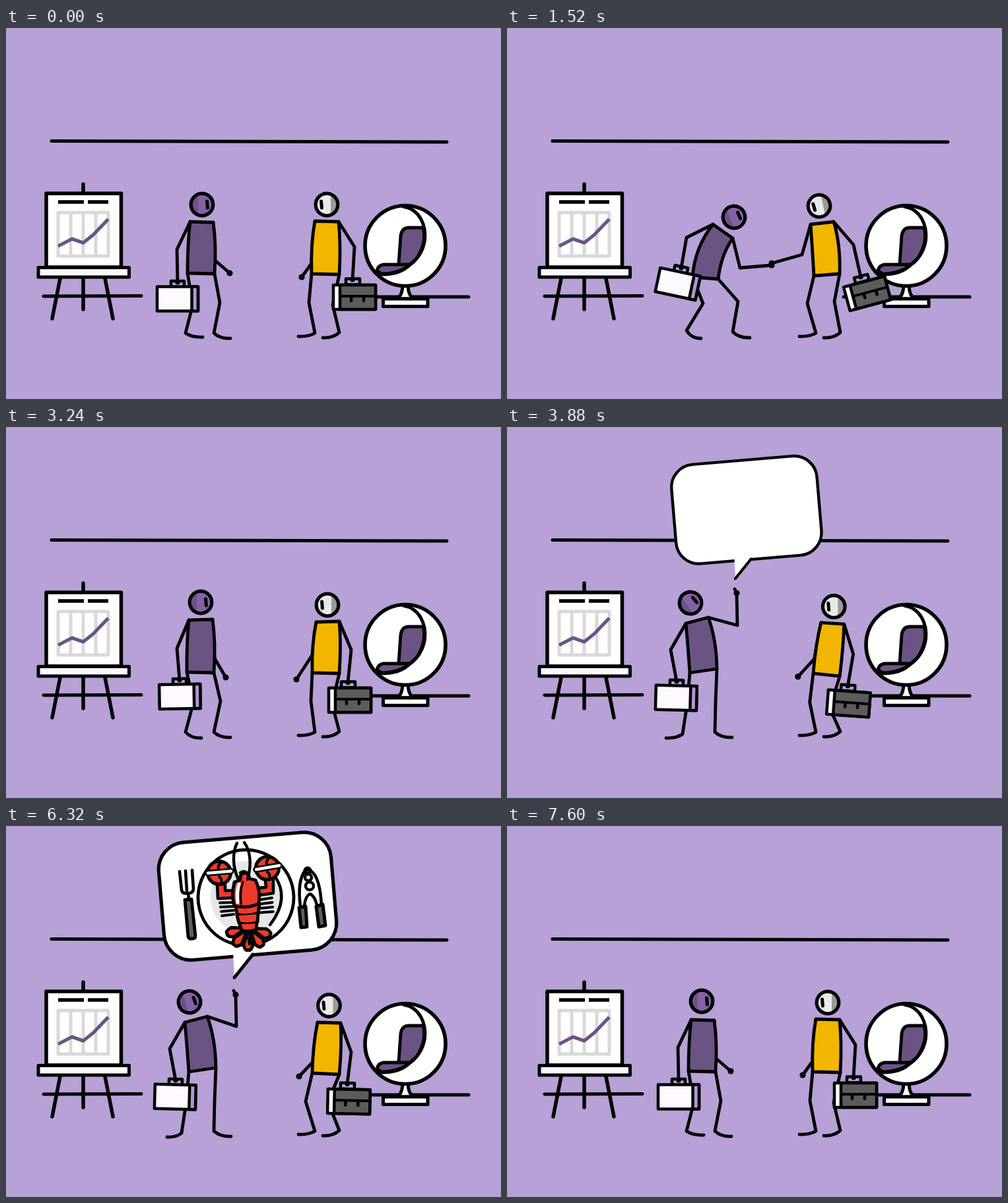
Write an HTML page with a canvas that moves like this. It is 750 px wide and 563 px high and loops after 7800 ms.

```html
<!DOCTYPE html>
<html lang="en">
<head>
<meta charset="utf-8">
<title>Lunch plans</title>
<style>
html, body { margin: 0; width: 100%; height: 100%; overflow: hidden; background: #b7a1d6; }
canvas { display: block; }
</style>
</head>
<body>
<canvas id="stage" width="750" height="563"></canvas>
<script>
const ctx = document.getElementById('stage').getContext('2d');
const LOOP = 7800, STEP = 40;
const BG = '#b7a1d6', INK = '#000', PLUM = '#6b5484', LILAC = '#8461a7',
      YELLOW = '#f2b600', RED = '#ee3a2b', DARK = '#5c5c5c', WHITE = '#fff';

const clamp = v => Math.max(0, Math.min(1, v));
const ease = v => v * v * (3 - 2 * v);
const ramp = (t, a, b) => clamp((t - a) / (b - a));

// ---------- drawing helpers ----------
const shapes = new Map();
function shape(d) {
  if (!shapes.has(d)) {
    const el = document.createElementNS('http://www.w3.org/2000/svg', 'path');
    el.setAttribute('d', d);
    shapes.set(d, { path: new Path2D(d), len: el.getTotalLength() });
  }
  return shapes.get(d);
}
function draw(d, fill, width = 5, color = INK) {
  const p = shape(d).path;
  if (fill) { ctx.fillStyle = fill; ctx.fill(p); }
  if (width) { ctx.lineWidth = width; ctx.strokeStyle = color; ctx.stroke(p); }
}
function trim(d, to, width = 4.4, color = INK, from = 0) {
  if (to <= from) return;
  const s = shape(d);
  ctx.save();
  if (from > 0 || to < 1) {
    ctx.setLineDash([(to - from) * s.len, s.len * 2]);
    ctx.lineDashOffset = -from * s.len;
  }
  ctx.lineWidth = width;
  ctx.strokeStyle = color;
  ctx.stroke(s.path);
  ctx.restore();
}
function tint(d, fill, alpha) {
  if (alpha <= 0) return;
  ctx.globalAlpha = alpha;
  draw(d, fill, 0);
  ctx.globalAlpha = 1;
}
function line(points, width = 5) {
  ctx.beginPath();
  for (let i = 0; i < points.length; i += 2) ctx.lineTo(points[i], points[i + 1]);
  ctx.lineWidth = width;
  ctx.strokeStyle = INK;
  ctx.stroke();
}
function box(x, y, w, h, fill, width = 4.5) {
  ctx.fillStyle = fill;
  ctx.fillRect(x, y, w, h);
  ctx.lineWidth = width;
  ctx.strokeStyle = INK;
  ctx.strokeRect(x, y, w, h);
}
function disc(x, y, r, fill) {
  ctx.beginPath();
  ctx.arc(x, y, r, 0, 7);
  ctx.fillStyle = fill;
  ctx.fill();
}

// ---------- poses ----------
// h: head x, y, tilt   t: torso corners   c: side bends   b: case arm elbow, hand, case angle
// f: free arm elbow, hand, fingertip      l, r: knee, ankle, toe
const L = {
  stand: {
    h: [295, 266, 0], t: [279, 294, 314, 295, 316, 373, 275, 372], c: [-2, 4],
    b: [259, 336, 260, 386, 0], f: [316, 352, 339, 372, 339, 372],
    l: [283, 420, 272, 463, 298, 469], r: [324, 417, 315, 463, 340, 471]
  },
  shake: {
    h: [341, 286, -18], t: [312, 300, 343, 318, 322, 381, 281, 378], c: [-12, -7],
    b: [269, 314, 266, 364, 7], f: [353, 363, 401, 357, 401, 357],
    l: [297, 418, 272, 459, 294, 471], r: [350, 415, 342, 461, 368, 470]
  },
  rest: {
    h: [295, 266, 0], t: [277, 293, 313, 292, 315, 373, 274, 372], c: [-2, 4],
    b: [259, 336, 263, 384, -1], f: [316, 351, 333, 380, 333, 380],
    l: [284, 418, 272, 463, 296, 472], r: [325, 416, 315, 463, 340, 471]
  },
  tell: {
    h: [278, 267, -35], t: [271, 298, 305, 289, 318, 367, 277, 373], c: [0, 6],
    b: [248, 338, 257, 386, 1.5], f: [349, 301, 348, 252, 345, 246],
    l: [273, 420, 266, 466, 241, 472], r: [316, 418, 315, 463, 341, 471]
  }
};
const R = {
  stand: {
    h: [486, 268, 0], t: [468, 293, 504, 294, 505, 374, 463, 373], c: [-4, 3],
    b: [528, 332, 525, 382, 0], f: [468, 350, 448, 378, 448, 378],
    l: [459, 417, 468, 463, 443, 468], r: [495, 420, 505, 462, 480, 470]
  },
  shake: {
    h: [473, 270, -12], t: [460, 298, 495, 294, 504, 373, 465, 376], c: [0, 6],
    b: [525, 329, 526, 378, -10], f: [447, 344, 401, 357, 401, 357],
    l: [455, 418, 468, 463, 443, 468], r: [496, 415, 505, 462, 480, 470]
  },
  rest: {
    h: [487, 270, 0], t: [470, 296, 505, 295, 505, 374, 464, 373], c: [-4, 3],
    b: [523, 338, 518, 388, 0], f: [464, 346, 440, 383, 440, 383],
    l: [462, 416, 468, 463, 443, 468], r: [494, 420, 505, 462, 480, 470]
  },
  listen: {
    h: [497, 273, 0], t: [477, 297, 512, 300, 504, 379, 464, 374], c: [-2, 2],
    b: [525, 346, 516, 394, 5], f: [466, 353, 441, 378, 441, 378],
    l: [458, 418, 468, 463, 443, 468], r: [488, 428, 505, 462, 480, 470]
  },
  nod: {
    h: [489.5, 272.5, 0], t: [472, 298, 507, 299, 505, 377, 464, 375], c: [-3, 3],
    b: [523, 343, 517, 391.5, 1.2], f: [465, 358, 444, 380, 444, 380],
    l: [454, 418, 468, 463, 443, 468], r: [488, 419, 505, 462, 480, 470]
  }
};

// Each key may set only some channels; every channel moves between its own keys.
const leftKeys = [
  [0, { ...L.stand, h: [297, 268, 0] }],
  [280, { r: [342, 408, 333, 450, 358, 458] }],
  [600, L.shake],
  [960, { h: L.shake.h, t: L.shake.t, b: L.shake.b, f: L.shake.f }],
  [1360, { b: [271, 317, 263, 364, 15] }],
  [1520, {
    h: [344, 287, -18], t: [312, 298, 342, 319, 320, 381, 281, 378],
    b: [272, 318, 264, 364, 12], f: [353, 364, 401, 360, 401, 360]
  }],
  [1640, { ...L.shake, h: [344, 287, -18], b: [270, 318, 263, 365, 11] }],
  [1900, { r: [340, 408, 331, 452, 356, 460] }],
  [2160, {
    ...L.rest, h: [293, 261, 0], b: [257, 334, 257, 382, 4],
    t: [276, 289, 311, 288, 315, 372, 274, 371]
  }],
  [2560, L.rest],
  [3240, L.rest],
  [3480, {
    b: [242, 334, 245, 382, 12], f: [338, 328, 374, 338, 375, 334],
    l: [276, 415, 264, 453, 252, 462]
  }],
  [3760, L.tell],
  [5680, L.tell],
  [6320, {
    ...L.tell, h: [278, 267, -15], f: [349, 304, 348, 256, 345, 250],
    l: [273, 420, 266, 466, 244, 472]
  }],
  [6640, { f: [338, 332, 372, 338, 372, 338], l: [280, 412, 268, 454, 274, 463] }],
  [7000, L.stand],
  [LOOP, L.stand]
];
const swing = (x, y, a) => ({ b: [525, 329, x, y, a] });
const rightKeys = [
  [0, R.stand],
  [600, R.shake],
  [960, swing(526, 378, -6.5)],
  [1360, swing(540, 376, -22)],
  [1520, swing(536, 378, -15)],
  [1600, swing(524, 381, -4)],
  [1640, { ...R.shake, b: [525, 330, 522, 382, -3] }],
  [2240, R.rest],
  [3440, R.rest],
  [4040, R.listen],
  [5680, R.listen],
  [6280, R.nod],
  [6400, R.nod],
  [7000, R.rest],
  [7240, R.rest],
  [7600, R.stand],
  [LOOP, R.stand]
];
const bubbleKeys = [
  [0, { s: [0] }], [3640, { s: [0] }], [3960, { s: [1] }], [6320, { s: [1] }],
  [6500, { s: [1.033] }], [6840, { s: [0] }], [LOOP, { s: [0] }]
];

function tracks(keys) {
  const out = {};
  for (const [t, pose] of keys)
    for (const name in pose) (out[name] ||= []).push([t, pose[name]]);
  return out;
}
function poseAt(tr, t) {
  const pose = {};
  for (const name in tr) {
    const keys = tr[name];
    let i = 0;
    while (i < keys.length - 2 && t >= keys[i + 1][0]) i++;
    const [t0, a] = keys[i], [t1, b] = keys[i + 1];
    const k = ease(ramp(t, t0, t1));
    pose[name] = a.map((v, j) => v + (b[j] - v) * k);
  }
  return pose;
}
const leftTrack = tracks(leftKeys), rightTrack = tracks(rightKeys), bubbleTrack = tracks(bubbleKeys);

// ---------- people ----------
function leg(x, y, [kx, ky, ax, ay, tx, ty]) {
  ctx.beginPath();
  ctx.moveTo(x, y);
  ctx.lineTo(kx, ky);
  ctx.lineTo(ax, ay);
  ctx.quadraticCurveTo(ax + (tx - ax) * 0.35, ty + 0.5, tx, ty);
  ctx.lineWidth = 4.8;
  ctx.strokeStyle = INK;
  ctx.stroke();
}
function head([x, y, tilt], dir) {
  ctx.save();
  ctx.translate(x, y);
  ctx.rotate(tilt * Math.PI / 180);
  ctx.beginPath();
  ctx.arc(0, 0, 16.8, 0, 7);
  ctx.save();
  ctx.clip();
  ctx.fillStyle = dir > 0 ? LILAC : '#e9e9e9';
  ctx.fillRect(-20, -20, 40, 40);
  ctx.fillStyle = dir > 0 ? PLUM : '#9a9a9a';
  ctx.fillRect(dir > 0 ? -20 : 6, -20, 14, 40);
  ctx.restore();
  ctx.lineWidth = 5.2;
  ctx.strokeStyle = INK;
  ctx.stroke();
  line([dir * 8 - 0.4, -5, dir * 8 + 0.4, 5], 5);
  ctx.restore();
}
function briefcase([, , x, y, angle], dir) {
  ctx.save();
  ctx.translate(x, y);
  ctx.rotate(angle * Math.PI / 180);
  ctx.lineWidth = 4.5;
  ctx.strokeStyle = INK;
  if (dir > 0) {
    ctx.strokeRect(-10, -2, 20, 9);
    box(-31, 6.5, 62, 37, '#fdf9ff');
    box(21.5, 6.5, 9.5, 37, '#b195d6');
  } else {
    ctx.strokeRect(-10, -1.5, 21, 9);
    box(-29, 8, 64, 37, WHITE);
    box(-19, 8, 54, 37, DARK);
    line([-19, 25, 35, 25], 4);
    line([-2, 26, -2, 32], 4.5);
    line([17, 26, 17, 32], 4.5);
  }
  ctx.restore();
  disc(x, y, 3.6, INK);
}
function person(p, dir) {
  const [x0, y0, x1, y1, x2, y2, x3, y3] = p.t, [cl, cr] = p.c;
  const free = dir > 0 ? [x1, y1] : [x0, y0], carry = dir > 0 ? [x0, y0] : [x1, y1];
  leg(x3, y3, p.l);
  leg(x2, y2, p.r);
  line([...free, ...p.f], 4.8);
  disc(p.f[2], p.f[3], 4.6, INK);
  ctx.beginPath();
  ctx.moveTo(x0, y0);
  ctx.lineTo(x1, y1);
  ctx.quadraticCurveTo((x1 + x2) / 2 + cr, (y1 + y2) / 2 - 5, x2, y2);
  ctx.lineTo(x3, y3);
  ctx.quadraticCurveTo((x0 + x3) / 2 + cl, (y0 + y3) / 2 - 5, x0, y0);
  ctx.closePath();
  ctx.fillStyle = dir > 0 ? PLUM : YELLOW;
  ctx.fill();
  ctx.lineWidth = 4.8;
  ctx.strokeStyle = INK;
  ctx.stroke();
  line([...carry, ...p.b.slice(0, 4)], 4.8);
  briefcase(p.b, dir);
  head(p.h, dir);
}

// ---------- room ----------
function room() {
  ctx.fillStyle = BG;
  ctx.fillRect(0, 0, 750, 563);
  line([69, 171.5, 668, 173]);
  line([57, 407, 205, 406.5]);
  line([510, 408, 701, 408]);
  // easel
  line([117, 237, 117, 427], 5.5);
  line([82, 380, 70, 441], 5.5);
  line([150, 380, 162, 441], 5.5);
  box(61, 251, 113.5, 112, WHITE, 5.5);
  box(49, 363.5, 137.5, 14.5, '#fdf6ff', 5);
  ctx.lineCap = 'butt';
  line([79, 264, 118, 264], 5.5);
  line([124, 264, 155, 264], 5.5);
  draw('M79 280H155V346H79ZM98 280V346M117 280V346M136 280V346', null, 5, '#d9d9d9');
  draw('M79 331L100 320L117 326L132 314L155 290', null, 5.2, PLUM);
  ctx.lineCap = 'round';
  // ball chair
  draw('M601 388Q601 409 590 411H620Q609 409 609 388Z', WHITE, 5);
  box(571.5, 411, 67.5, 11.5, WHITE, 5);
  draw('M544 330.5A61 61 0 1 1 666 330.5A61 61 0 1 1 544 330.5Z', WHITE, 5.6);
  draw('M595 358L598 315Q600 303 610 303H632Q638 325 622 350L608 362Z', PLUM, 4.8);
  draw('M562 368Q564 360 572 359H612Q598 374 570 374Z', PLUM, 4.8);
  draw('M602 271C626 275 637 298 634.5 322C630 350 606 374 566 373', null, 5);
}

// ---------- speech bubble ----------
const FORK = 'M271 112L276 168Q277 172 282 171Q287 171 287 167L281 111Z';
const GRIPS = ['M444 124L447 154L456 153L454 122Z', 'M470 122L474 153L484 151L480 119Z'];
const BODY = 'M346 85Q341 106 346 121Q365 126 383 118Q386 98 378 82L369 80Q368 71 361 71Q354 72 355 82Z';
const BANDS = [
  'M348 122L350 134Q366 138 382 132L384 119',
  'M350 136L353 147Q367 151 381 146L382 134',
  'M354 149L357 158Q368 162 379 157L380 148'
];
const CLAWS = [
  { x: 323, y: 71, tilt: 1.5, hook: 'M317 84Q323 78 330 83L332 95' },
  { x: 396, y: 64, tilt: 3, hook: 'M402 76L392 76Q388 82 391 92' }
];
const ARMS = [
  { core: 'M346 103L327 104L326 90', top: 'M345 98L332 98L332 89', low: 'M345 109L321 110L320 88' },
  { core: 'M381 100L400 97L399 84', top: 'M381 94L394 93L393 83', low: 'M384 105L405 102L405 80' }
];
const ARCS = ['M317 84Q330 62 352 55', 'M342 156Q350 163 363 163', ...CLAWS.map(c => c.hook)];
const circle = (x, y, r) => `M${x} ${y + r}A${r} ${r} 0 1 1 ${x} ${y - r}A${r} ${r} 0 1 1 ${x} ${y + r}`;
const fan = [72, -72, 37, -37, 0].map(deg => {
  const at = (a, r) => `${368 + r * Math.sin(a)} ${154 + r * Math.cos(a)}`;
  const a = (deg - 2) * Math.PI / 180;
  return `M${at(a, 4)}L${at(a - 0.27, 27)}Q${at(a - 0.12, 37)} ${at(a, 34)}Q${at(a + 0.12, 37)} ${at(a + 0.27, 27)}Z`;
});

function plate(t) {
  tint(circle(365, 108, 55), '#e6e6e6', ramp(t, 4840, 5080));
  trim('M381 179A72.5 72.5 0 1 0 346 179Q363 183 381 179', ramp(t, 4000, 4860), 4.8);
  trim('M405 73Q432 108 400 150', ramp(t, 4360, 4800));
  for (const d of ARCS) trim(d, ramp(t, 4440, 4780), 4.4, INK, ramp(t, 4840, 5040));
}
function cutlery(t) {
  const a = ramp(t, 4300, 5000), b = ramp(t, 4480, 5200), tone = ramp(t, 4880, 5160);
  tint(FORK, DARK, tone);
  trim('M263 69L266 97Q267 103 275 102', a, 4.6);
  trim('M272 68L274 98', a, 4.6);
  trim('M277 112L276 102Q284 102 284 95L282 67', a, 4.6);
  trim(FORK, a, 4.8);
  trim('M446 122Q441 84 453 68', a, 4.6);
  trim('M478 121Q476 78 462 68', a, 4.6);
  trim('M452 121Q454 105 461 103Q468 107 471 120', ramp(t, 4840, 5240));
  tint(circle(457, 68, 5), '#333', tone);
  trim('M453 69Q456 63 460 67', ramp(t, 4500, 4760), 4.6);
  for (const [x, y, r] of [[457, 68, 4.5], [458, 78, 5], [460, 91, 6]])
    trim(circle(x, y, r), ramp(t, 4810, 5240));
  for (const d of GRIPS) {
    tint(d, DARK, tone);
    trim(d, b, 5);
  }
}
function lobster(t) {
  const tone = ramp(t, 4840, 5120), late = ramp(t, 4980, 5400);
  for (let i = 0; i < 4; i++) {
    trim(`M345 ${116 + i * 6}L${324 + i} ${116.5 + i * 6.6}`, late, 4);
    trim(`M384 ${112 + i * 6.5}L${403 + i * 0.6} ${109 + i * 7}`, late, 4);
  }
  for (const { core, top, low } of ARMS) {
    ctx.lineCap = 'butt';
    trim(core, ramp(t, 4660, 5060), 9, RED);
    ctx.lineCap = 'round';
    trim(top, ramp(t, 4600, 4960), 4.6);
    trim(low, ramp(t, 4820, 5200), 4.6);
  }
  for (const d of fan) {
    tint(d, RED, tone);
    trim(d, ramp(t, 4820, 5360), 4.8);
  }
  trim('M368 170L369 179', ramp(t, 4560, 4760), 4.6);
  BANDS.forEach((d, i) => {
    tint(d, RED, tone);
    trim(d, i === 1 ? ramp(t, 4400, 4780) : ramp(t, 4800, 5240), 4.8);
  });
  tint(BODY, RED, tone);
  trim('M353 88Q349 100 351 116', tone, 5, WHITE);
  trim('M359 85Q354 98 356 118', late, 3.4);
  trim(BODY, ramp(t, 4600, 5240), 4.8);
  for (const { x, y, tilt } of CLAWS) {
    const d = circle(x, y, 17.5);
    const bar = `M${x - 17} ${y + tilt - 1}L${x + 18} ${y - tilt - 1}`;
    tint(d, RED, tone);
    trim(d, ramp(t, 4820, 5240), 5);
    trim(`M${x + 3} ${y - 16}Q${x - 4} ${y - 9} ${x} ${y - 5}`, late, 4);
    trim(`M${x} ${y + 6}Q${x + 5} ${y + 9} ${x + 3} ${y + 16}`, late, 4);
    trim(bar, late, 9.5);
    trim(bar, late, 4.4, WHITE);
  }
  trim('M352 81C343 62 343 40 350 26', late);
  trim('M366 81C372 60 371 38 361 25', late);
  trim('M355 71Q360 67 365 71', late);
}
function bubble(t) {
  const s = poseAt(bubbleTrack, t).s[0];
  if (s < 0.01) return;
  ctx.save();
  ctx.translate(346, 230);
  ctx.scale(s, s);
  ctx.translate(-346, -230);
  ctx.save();
  ctx.translate(366, 106.5);
  ctx.rotate(-0.084);
  ctx.beginPath();
  ctx.roundRect(-131, -89.5, 262, 179, 41);
  ctx.fillStyle = WHITE;
  ctx.fill();
  ctx.lineWidth = 5.2;
  ctx.strokeStyle = INK;
  ctx.stroke();
  ctx.restore();
  draw('M344.5 190V202L346 230L374 196L373 189Z', WHITE, 0);
  draw('M346 230L374 195', null, 5);
  plate(t);
  cutlery(t);
  lobster(t);
  ctx.restore();
}

// ---------- loop ----------
function render(t) {
  const left = poseAt(leftTrack, t), right = poseAt(rightTrack, t);
  if (t > 680 && t < 1660) {
    const dy = 5 * Math.sin((t - 680) / 280 * Math.PI * 2);
    for (const p of [left, right]) {
      p.f[1] += dy / 2;
      p.f[3] += dy;
      p.f[5] += dy;
    }
  }
  ctx.lineCap = ctx.lineJoin = 'round';
  room();
  bubble(t);
  person(left, 1);
  person(right, -1);
}
const start = performance.now();
function tick() {
  const t = (performance.now() - start) % LOOP;
  render(Math.floor(t / STEP) * STEP);
  requestAnimationFrame(tick);
}
tick();
</script>
</body>
</html>
```
